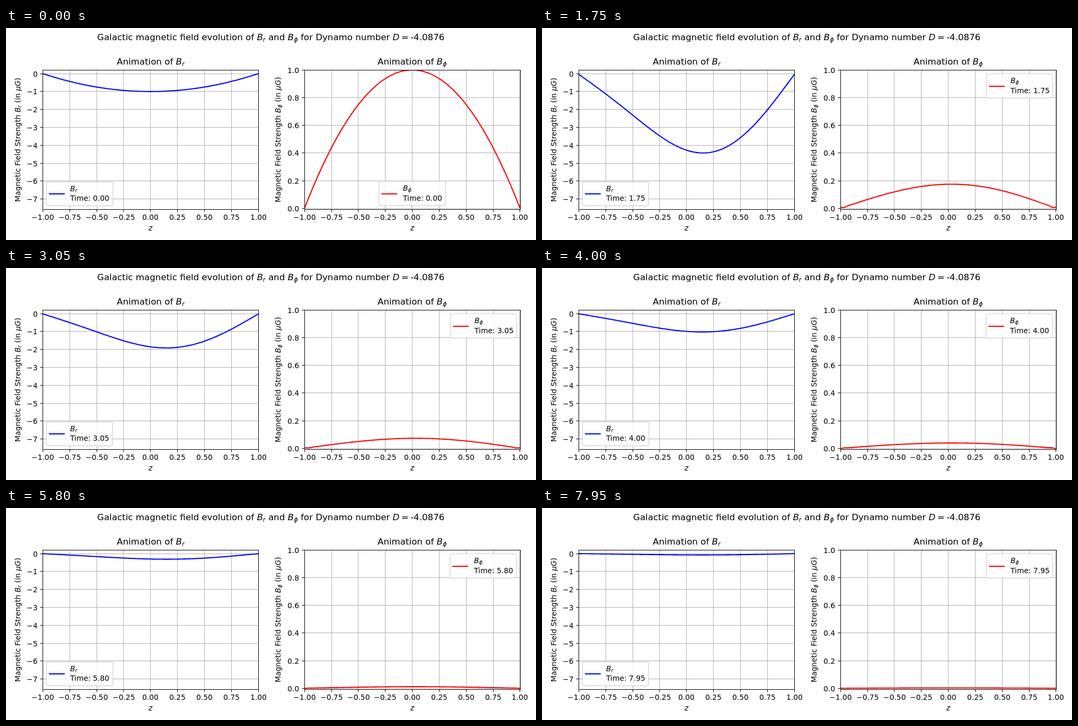
An HTML page with a canvas for the animation above (8000 ms loop, 1000 px wide and 400 px high).

```html
<!DOCTYPE html>
<html lang="en">
<head>
<meta charset="utf-8">
<title>Galactic magnetic field evolution</title>
<style>
html, body { margin: 0; width: 100%; height: 100%; overflow: hidden; background: #fff; }
canvas { display: block; }
</style>
</head>
<body>
<canvas id="stage" width="1000" height="400"></canvas>
<script>
const ctx = document.getElementById('stage').getContext('2d');
const { PI, cos, sin, exp, abs, round } = Math;
const TOP = 79, BOTTOM = 342, SMALL = 13.89, LARGE = 16.67;
const STEP = 50, LOOP = 8000;
const snap = v => Math.floor(v) + 0.5;

const panels = [
  { left: 69.4, sub: 'r', color: '#00f', zero: 86.05, unit: 33.8, ticks: [0, -1, -2, -3, -4, -5, -6, -7],
    digits: 0, labelX: 27, field: radial },
  { left: 563.2, sub: 'ϕ', color: '#f00', zero: 340.2, unit: 261, ticks: [0, 0.2, 0.4, 0.6, 0.8, 1],
    digits: 1, labelX: 518, field: azimuthal }
];
const WIDTH = 406.7;
const xAt = (p, z) => p.left + (z + 1) * WIDTH / 2;
const yAt = (p, v) => p.zero - p.unit * v;

// Even profile: a parabola relaxing to the slowest diffusion mode.
function evenShape(z, t, sharp, floor) {
  const mode = (cos(PI * z / 2) + sharp * cos(1.5 * PI * z) + floor) / (1 + sharp + floor);
  return mode + (1 - z * z - mode) * exp(-14 * t);
}

function radial(z, t) {
  const slow = exp(-0.66 * t), mid = exp(-2.75 * t), fast = exp(-7.1 * t);
  const even = 13.9 * slow - 12.9 * mid;
  const odd = 23.1 * (0.54 * (slow - fast) / 6.44 + 0.46 * (mid - fast) / 4.35);
  return -even * evenShape(z, t, 0.015, 0.01) - odd * sin(PI * z);
}

function azimuthal(z, t) {
  const size = 0.54 * exp(-0.66 * t) + 0.46 * exp(-2.7 * t);
  const odd = 0.024 * (1 - exp(-5 * t)) * sin(PI * z);
  // Edge ripple that flips sign at every time step.
  const flip = round(t * 20) % 2 ? 1 : -1;
  const ripple = flip * 0.0155 * exp(-0.4 * t) * (1 - exp(-1.5 * t));
  const edge = 1 - abs(z);
  return size * (evenShape(z, t, 0, 0) + odd) + ripple * cos(PI * edge / 0.045) * exp(-edge / 0.04);
}

// Text runs are split by "|"; "*" marks italic, "_" an italic subscript.
function write(text, x, y, size, align = 0) {
  const runs = text.split('|').map(run => {
    const mark = '*_'.includes(run[0]) ? run[0] : '';
    const px = mark === '_' ? size * 0.7 : size;
    const font = `${mark ? 'italic ' : ''}${px}px "DejaVu Sans", sans-serif`;
    const body = run.slice(mark.length);
    ctx.font = font;
    return { body, font, drop: mark === '_' ? size * 0.16 : 0, width: ctx.measureText(body).width };
  });
  x = round(x - align * runs.reduce((sum, run) => sum + run.width, 0));
  ctx.fillStyle = '#000';
  for (const run of runs) {
    ctx.font = run.font;
    ctx.fillText(run.body, x, y + run.drop);
    x += run.width;
  }
}

function line(x1, y1, x2, y2, color, width = 1) {
  ctx.strokeStyle = color;
  ctx.lineWidth = width;
  ctx.beginPath();
  ctx.moveTo(x1, y1);
  ctx.lineTo(x2, y2);
  ctx.stroke();
}

const number = (v, digits) => v.toFixed(digits).replace('-', '−');

function drawAxes(p) {
  const right = p.left + WIDTH, middle = xAt(p, 0);
  for (let i = 0; i <= 8; i++) {
    const z = i / 4 - 1, x = snap(xAt(p, z));
    line(x, TOP, x, BOTTOM, '#b0b0b0');
    line(x, BOTTOM + 0.5, x, BOTTOM + 5.4, '#000');
    write(number(z, 2), xAt(p, z), 362, SMALL, 0.5);
  }
  for (const v of p.ticks) {
    const y = snap(yAt(p, v));
    line(p.left, y, right, y, '#b0b0b0');
    line(p.left - 4.9, y, p.left, y, '#000');
    write(number(v, p.digits), p.left - 9.7, y + 5.5, SMALL, 1);
  }
  write(`Animation of |*B|_${p.sub}`, middle, 69, LARGE, 0.5);
  write('*z', middle, 382, SMALL, 0.5);
  ctx.save();
  ctx.translate(p.labelX, 211);
  ctx.rotate(-PI / 2);
  write(`Magnetic Field Strength |*B|_${p.sub}| (in |*μG|)`, 0, 0, SMALL, 0.5);
  ctx.restore();
}

function drawCurve(p, t) {
  ctx.save();
  ctx.beginPath();
  ctx.rect(p.left, TOP, WIDTH, BOTTOM - TOP + 0.5);
  ctx.clip();
  ctx.beginPath();
  for (let i = 0; i <= 200; i++) {
    const z = i / 100 - 1;
    ctx.lineTo(xAt(p, z), yAt(p, p.field(z, t)));
  }
  ctx.strokeStyle = p.color;
  ctx.lineWidth = 2.08;
  ctx.lineJoin = 'round';
  ctx.stroke();
  ctx.restore();
  ctx.strokeStyle = '#000';
  ctx.lineWidth = 1;
  ctx.strokeRect(snap(p.left), TOP + 0.5, round(WIDTH), BOTTOM - TOP);
}

function drawLegend(p, t, x, y, width, height) {
  ctx.beginPath();
  ctx.roundRect(x, y, width, height, 2.8);
  ctx.fillStyle = 'rgba(255,255,255,0.8)';
  ctx.fill();
  ctx.strokeStyle = 'rgba(204,204,204,0.8)';
  ctx.lineWidth = 1.39;
  ctx.stroke();
  const base = round(y + height - 9.2);
  line(x + 4.5, base - 13, x + 34.4, base - 13, p.color, 2.08);
  write(`*B|_${p.sub}`, x + 45, base - (p.sub === 'r' ? 18 : 19), SMALL);
  write(`Time: ${t.toFixed(2)}`, x + 45, base, SMALL);
}

function draw(now) {
  const step = Math.floor(now % LOOP / STEP), t = step * STEP / 1000;
  ctx.fillStyle = '#fff';
  ctx.fillRect(0, 0, 1000, 400);
  write('Galactic magnetic field evolution of |*B|_r| and |*B|_ϕ| for Dynamo number |*D|\u2009=\u2009-4.0876',
    500, 23, LARGE, 0.5);
  for (const p of panels) {
    drawAxes(p);
    drawCurve(p, t);
  }
  const width = 125.5 - step % 2;
  drawLegend(panels[0], t, 76.4, 290.5, width, 45);
  // The legend starts below the arch and moves up once the corner is free.
  if (step < 2) drawLegend(panels[1], t, 766.5 - width / 2, 289, width, 46);
  else drawLegend(panels[1], t, 963.3 - width, 86.4, width, 46);
}

const start = performance.now();
function tick() {
  draw(performance.now() - start);
  requestAnimationFrame(tick);
}
tick();
</script>
</body>
</html>
```
